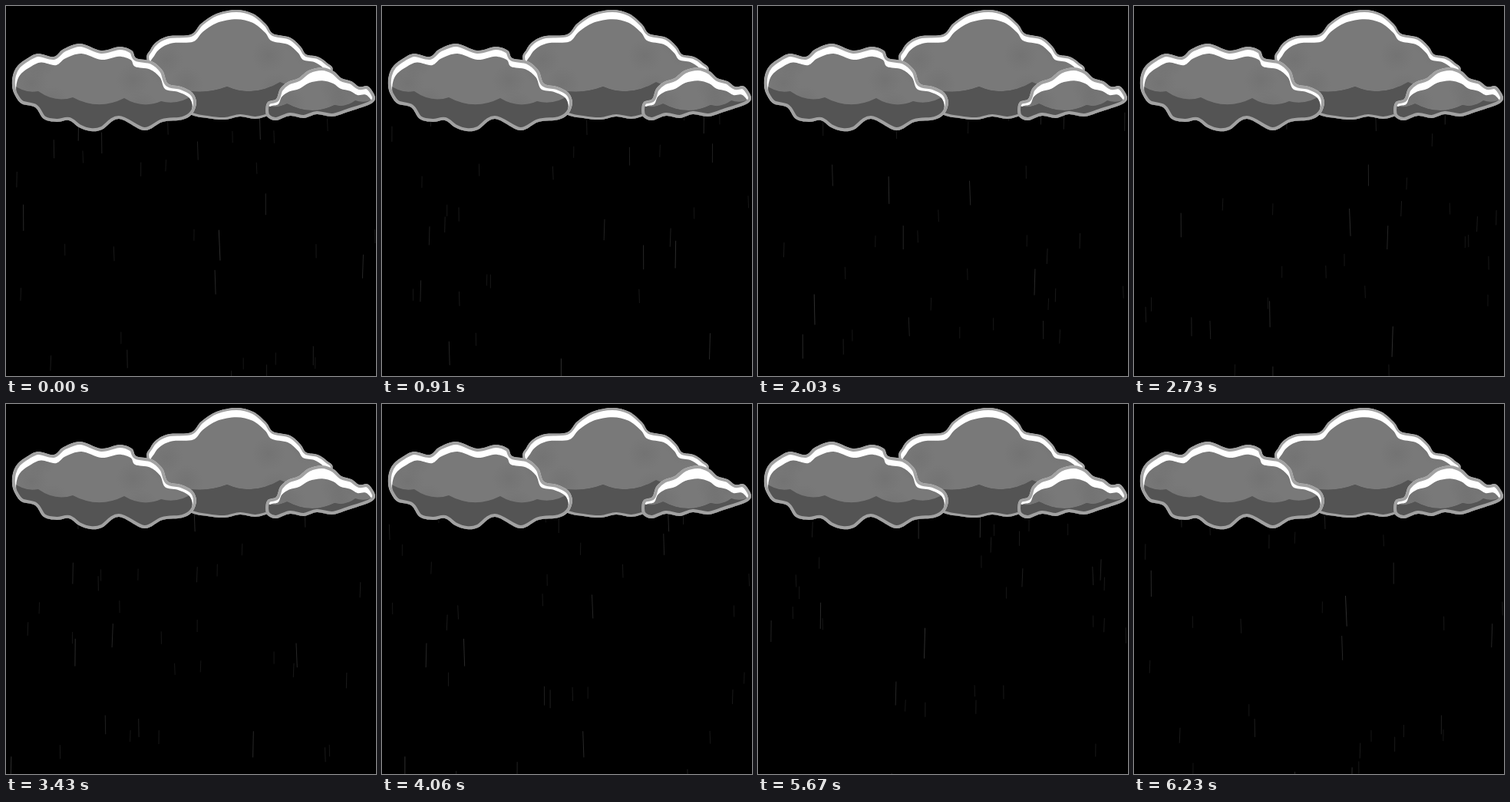
An HTML page with a canvas that plays this animation: 482 by 482 pixels, repeating every 6.3 s.

```html
<!DOCTYPE html>
<html>
<head>
<meta charset="utf-8">
<style>
html, body { margin: 0; background: #000; overflow: hidden; }
canvas { display: block; }
</style>
</head>
<body>
<canvas id="stage" width="482" height="482"></canvas>
<script>
const ctx = document.getElementById('stage').getContext('2d');
const LOOP = 6300, STEP = 70, SIZE = 482, DROPS = 36, RAIN_TOP = 105;

const random = seed => {
  const v = Math.sin(seed * 127.1 + 11.7) * 43758.5453;
  return v - Math.floor(v);
};
const points = text => text.split(' ').map(p => p.split(',').map(Number));

// Closed smooth curve through the points.
function blob(p) {
  const path = new Path2D(), at = i => p[(i + p.length) % p.length];
  path.moveTo(...p[0]);
  p.forEach((b, i) => {
    const a = at(i - 1), c = at(i + 1), d = at(i + 2);
    path.bezierCurveTo(b[0] + (c[0] - a[0]) / 6, b[1] + (c[1] - a[1]) / 6,
      c[0] - (d[0] - b[0]) / 6, c[1] - (d[1] - b[1]) / 6, ...c);
  });
  return path;
}

// Area below a row of lobes that sag between cusps.
function lobes(p) {
  const path = new Path2D();
  path.moveTo(p[0][0], SIZE);
  path.lineTo(...p[0]);
  for (let i = 1; i < p.length; i++) {
    const [x0, y0] = p[i - 1], [x, y] = p[i];
    path.quadraticCurveTo((x0 + x) / 2, (y0 + y) / 2 + (x - x0) * 0.26, x, y);
  }
  path.lineTo(p[p.length - 1][0], SIZE);
  return path;
}

// The lit edge is what remains between the outline and its copy shrunk to the base.
function cloud(outline, cusps, rim, shrink) {
  const p = points(outline), xs = p.map(q => q[0]), ys = p.map(q => q[1]);
  const left = Math.min(...xs), right = Math.max(...xs), base = Math.max(...ys);
  const middle = (left + right) / 2, top = Math.min(...ys);
  const inner = p.map(([x, y]) => [
    middle + (x - middle) * 0.955,
    base - (base - y) * shrink
  ]);
  return {
    outline: blob(p), body: blob(inner), shade: lobes(points(cusps)),
    rim, left, right, top, base
  };
}

const clouds = [
  cloud('184,72 188,57 197,46 213,39 241,37 254,23 274,10 300,5 322,10 339,24 348,36 370,41 384,53 391,63 406,66 418,74 425,86 400,125 345,142 325,147 305,144 285,148 262,146 238,140 205,115',
    '190,91 288,105 357,99 430,95', 6, 0.915),
  cloud('8,104 9,90 15,78 28,68 42,62 62,66 75,56 97,49 124,58 148,53 164,58 170,68 190,72 204,84 211,101 228,105 243,113 248,126 243,140 230,148 204,151 180,162 147,147 125,161 110,163 95,158 82,149 66,151 49,147 38,132 20,127 11,115',
    '6,100 42,111 87,119 154,120 202,124 250,112', 8, 0.885),
  cloud('338,136 341,125 352,121 357,108 367,99 381,94 394,84 412,80 427,85 437,94 450,98 460,105 470,104 476,109 481,120 474,128 445,138 425,144 405,141 388,146 370,143 352,149 341,145',
    '336,128 366,127 428,129 455,123 482,119', 8, 0.75)
];

function drawCloud({ outline, body, shade, rim, left, right, top, base }) {
  const fill = (path, color) => { ctx.fillStyle = color; ctx.fill(path); };
  ctx.save();
  ctx.clip(outline);
  fill(outline, '#fff');
  fill(body, '#797979');
  ctx.save();
  ctx.clip(body);
  for (let i = 0; i < 8; i++) {
    const x = left + (right - left) * random(i + 0.1);
    const y = top + (base - top) * random(i + 0.5);
    const soft = ctx.createRadialGradient(x, y, 0, x, y, 22);
    soft.addColorStop(0, 'rgba(90,90,90,.18)');
    soft.addColorStop(1, 'rgba(90,90,90,0)');
    ctx.fillStyle = soft;
    ctx.fillRect(x - 22, y - 22, 44, 44);
  }
  ctx.restore();
  // Shade reaches the rim at the base but never covers the lit edge.
  ctx.save();
  ctx.clip(shade);
  fill(body, '#545454');
  ctx.beginPath();
  ctx.rect(left, base - (base - top) * 0.3, (right - left) * 0.95, SIZE);
  ctx.fill();
  ctx.restore();
  ctx.strokeStyle = '#a2a2a2';
  ctx.lineWidth = rim;
  ctx.stroke(outline);
  ctx.restore();
}

// Near drops are longer, brighter and faster; each fall starts at a new place.
function drawDrop(i, t) {
  const depth = random(i + 0.3);
  const length = 15 / (1 - 0.72 * depth * depth);
  const falls = 6 + Math.round(length / 9);
  const phase = t / LOOP * falls + random(i + 0.6);
  const seed = i * 31 + Math.floor(phase) % falls;
  const x = random(seed) * SIZE;
  const y = RAIN_TOP + phase % 1 * (SIZE - RAIN_TOP);
  const slant = (random(seed + 0.4) - 0.5) * 0.09;
  const grey = Math.round(7 + length);
  ctx.strokeStyle = `rgb(${grey},${grey},${grey})`;
  ctx.lineWidth = length > 40 ? 1.4 : 1;
  ctx.beginPath();
  ctx.moveTo(x + slant * (y - RAIN_TOP), y);
  ctx.lineTo(x + slant * (y + length - RAIN_TOP), y + length);
  ctx.stroke();
}

function frame(now) {
  const t = Math.floor(now % LOOP / STEP) * STEP;
  ctx.fillStyle = '#000';
  ctx.fillRect(0, 0, SIZE, SIZE);
  for (let i = 0; i < DROPS; i++) drawDrop(i, t);
  clouds.forEach(drawCloud);
  requestAnimationFrame(frame);
}
requestAnimationFrame(frame);
</script>
</body>
</html>
```
